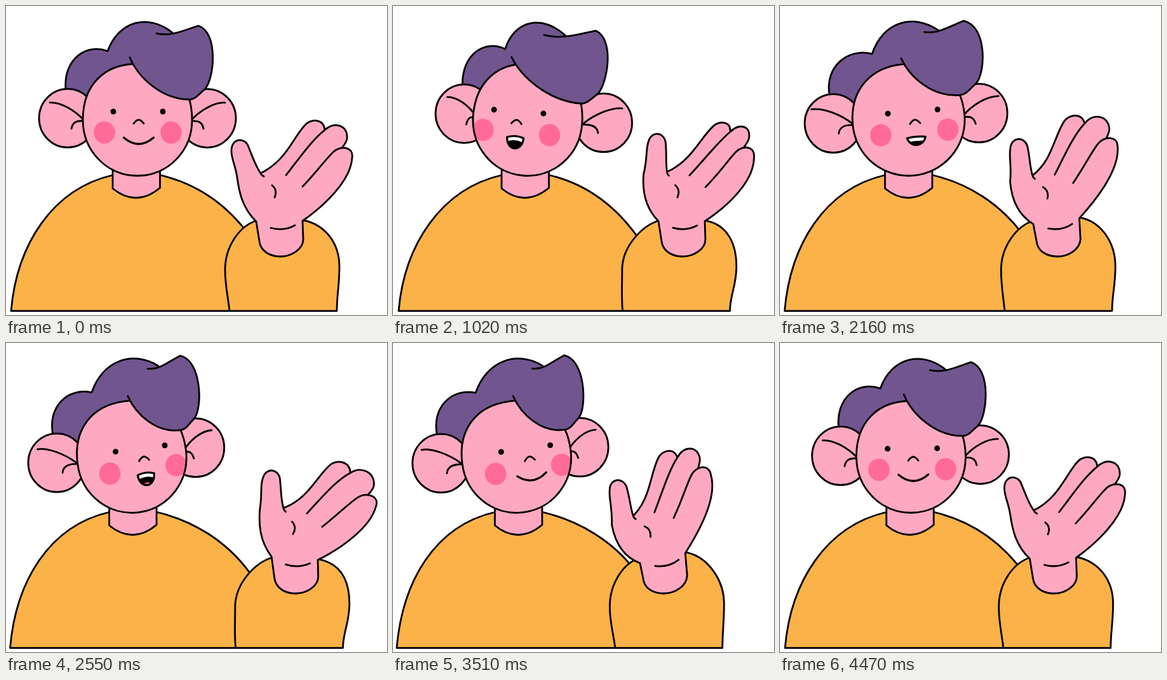
Animation of 600 by 486 pixels, one loop 4500 ms. Source, as an HTML page:

```html
<!DOCTYPE html>
<html lang="en">
<head>
<meta charset="utf-8">
<title>Waving hello</title>
<style>
html, body { margin: 0; width: 100%; height: 100%; overflow: hidden; background: #fff; }
svg { display: block; width: 100%; height: 100%; }
.ln { fill: none; stroke: #000; stroke-width: 2.8; stroke-linecap: round; stroke-linejoin: round; }
.skin { fill: #ffa8c2; }
.hair { fill: #71558f; }
.cloth { fill: #fbb248; }
.blush { fill: #ff6b98; }
</style>
</head>
<body>
<svg viewBox="0 0 600 486" xmlns="http://www.w3.org/2000/svg">
  <defs>
    <clipPath id="faceClip"><path id="faceMask"/></clipPath>
    <clipPath id="mouthClip"><path id="mouthMask"/></clipPath>
  </defs>
  <path id="body" class="ln cloth"/>
  <path id="neck" class="ln skin"/>
  <path id="backFill" class="hair"/>
  <path id="backLine" class="ln"/>
  <ellipse id="earL" class="ln skin" rx="45" ry="46"/>
  <ellipse id="earR" class="ln skin" rx="45" ry="46"/>
  <path id="earLines" class="ln"/>
  <path id="face" class="skin"/>
  <g clip-path="url(#faceClip)">
    <ellipse id="cheekL" class="blush" rx="16.8" ry="17.5"/>
    <ellipse id="cheekR" class="blush" rx="16.8" ry="17.5"/>
  </g>
  <path id="faceRim" class="ln"/>
  <circle id="eyeL" r="4.5"/>
  <circle id="eyeR" r="4.5"/>
  <path id="nose" class="ln"/>
  <g id="mouth">
    <path id="mouthFill"/>
    <g clip-path="url(#mouthClip)">
      <path id="teeth" fill="none" stroke="#fff" stroke-width="13"/>
      <ellipse id="tongue" class="blush" rx="7" ry="4"/>
    </g>
    <path id="lips" class="ln" style="stroke-width:3.2"/>
  </g>
  <path id="lockFill" class="hair"/>
  <path id="lockLine" class="ln"/>
  <path id="sleeve" class="ln cloth"/>
  <path id="handFill" class="skin"/>
  <path id="handLine" class="ln"/>
</svg>
<script>
const LOOP = 4500, FLOOR = 479.6, RAD = Math.PI / 180;

// Head parts around the face centre: x, y and how far the point follows a turn.
const FACE = 'M-86,0 C-86,-54 -53,-88 0,-88 C53,-88 86,-54 86,0 C86,49 48,88 0,88 C-48,88 -86,49 -86,0Z';
const BACK = 'M-113,-48,-.4 C-117,-94,-.4 -82,-121,-.3 -47,-108,-.2 C-29,-157,.2 18,-167,.4 55,-137,.35';
const LOCK = 'M30,-136,.9 C53,-131,.5 68,-139,.2 96,-148 C128,-137 121,-64 106,-48 ' +
  'C96,-40 91,-32 82,-32 C38,-32,.4 1,-67,1 -12,-98,1.3';
const EAR = 'M-138,-27,-.6 C-122,-28,-.6 -100,-16,-.4 -85,0,-.2 M-104,14,-.5 C-102,3,-.5 -95,1,-.3 -85,2,-.2';
const NOSE = 'M-6,6,1.2 C0,-2,1.2 4,-2,1.2 10,6,1.2';

// Hand parts around the wrist.
const THUMB = 'M-36,-1 C-58,-22 -63,-48 -66,-70 C-69,-92 -76,-100 -75,-114 ' +
  'C-74,-133 -53,-134 -48,-118 C-41,-101 -37,-88 -29,-77';
const INDEX = 'C12,-97 22,-134 42,-154 C50,-162 70,-164 72,-145';
const MIDDLE = 'C87,-159 107,-152 107,-135 C108,-130 103,-122 100,-118';
const RING = 'C97,-121 118,-119 115,-101 C113,-65 70,-25 37,-2';
const CUFF = 'L38,27 C38,42 20,54 2,54 C-14,54 -29,46 -31,30 L-36,-1';
const CREASES = 'M72,-145 C52,-130 30,-98 11,-74 M37,-56 C60,-80 74,-100 86,-111 ' +
  'M-29,-77 C-28,-74 -26,-73 -24,-72 M-13,9 C-2,12 12,12 25,5 M-11,-58 C-5,-53 -4,-46 -7,-39';

// time, centre x, turn, tilt, frontal widening
const headAt = track([
  [0, 207, 0, 0, 0],
  [300, 212, -16, 4.4, 0],
  [1020, 212, -16, 4.4, 0],
  [1710, 208, -6, 0, 1],
  [2550, 198, 14, -7.3, 0],
  [3090, 195, 15, -7.3, 0],
  [4080, 194, 15.5, -8.5, 0]
]);

// time, wrist x, finger swing, finger fan, thumb swing
const handAt = track([
  [0, 430, 0, 0, 0],
  [580, 452, 6, 0, 8],
  [1020, 454, 1.3, -2, 11],
  [1710, 427, -20, -1.5, -3],
  [1880, 423, -20.5, -.5, -5],
  [2550, 454, 7.3, 1.5, 12],
  [3090, 443, -3.5, -1, .5],
  [3680, 421, -21, -.5, -6],
  [3960, 421, -20, 1, -9]
]);

// time, smile, talking
const moodAt = track([
  [0, 1, 0], [220, 1, 0], [330, 0, 1], [1260, 0, 1], [1420, .2, 0],
  [2000, .2, 0], [2120, 0, 1], [3090, 0, 1], [3260, .9, 0]
]);

// Periodic monotone cubic through the keys.
function track(keys) {
  const n = keys.length;
  const gap = k => (keys[(k + 1) % n][0] - keys[k][0] + LOOP) % LOOP;
  const rate = (k, i) => (keys[(k + 1) % n][i] - keys[k][i]) / gap(k);
  const slope = (k, i) => {
    const a = rate((k + n - 1) % n, i), b = rate(k, i);
    return a * b > 0 ? 2 * a * b / (a + b) : 0;
  };
  return t => {
    let k = n - 1;
    while (keys[k][0] > t) k--;
    const next = (k + 1) % n, h = gap(k), u = (t - keys[k][0]) / h;
    const s = u * u * (3 - 2 * u), p = u * (1 - u) * (1 - u) * h, q = u * u * (u - 1) * h;
    return keys[k].slice(1).map((v, j) =>
      v + (keys[next][j + 1] - v) * s + slope(k, j + 1) * p + slope(next, j + 1) * q);
  };
}

const $ = id => document.getElementById(id);
const set = (id, attrs) => {
  for (const name in attrs) $(id).setAttribute(name, attrs[name]);
};
const draw = (d, ...ids) => ids.forEach(id => set(id, { d }));
const place = (id, [cx, cy]) => set(id, { cx, cy });
const mix = (a, b, u) => a + (b - a) * u;
const ease = (from, to, v) => {
  const u = Math.min(1, Math.max(0, (v - from) / (to - from)));
  return u * u * (3 - 2 * u);
};
const spin = (x, y, deg) => {
  const c = Math.cos(deg * RAD), s = Math.sin(deg * RAD);
  return [x * c - y * s, x * s + y * c];
};
// Sends every point of a path through a rule.
const bend = (d, rule) => d.replace(/(-?[\d.]+),(-?[\d.]+)(?:,(-?[\d.]+))?/g,
  (_, x, y, depth = 0) => rule(+x, +y, +depth).map(v => v.toFixed(2)).join());

function drawBody(lean) {
  const left = 8 + lean * .17, x = 168 + lean * .6;
  draw(`M${left},${FLOOR} C${left + 9},375 ${x - 95},288 ${x},266 L${x + 75},266
    C${x + 130},279 347,310 385,363 L400,${FLOOR}Z`, 'body');
  draw(`M${x},255 V287 Q${x + 37},317 ${x + 74.5},286 V255`, 'neck');
}

function drawHead([cx, turn, tilt, wide]) {
  const rig = (side, gain) => (x, y, depth) => {
    const [px, py] = spin(side * x * (1 + wide * x * x / 121000), y, tilt * gain);
    return [cx + px + turn * depth, 179 + py];
  };
  const at = rig(1, 1), earL = rig(1, .85), earR = rig(-1, .85);
  const back = bend(BACK, at), lock = bend(LOCK, at);
  draw(back, 'backLine');
  draw(back + bend('L30,-50 L-70,-20Z', at), 'backFill');
  draw(lock, 'lockLine');
  draw(lock + 'Z', 'lockFill');
  draw(bend(FACE, at), 'face', 'faceMask', 'faceRim');
  place('earL', earL(-110, -2.5, -.6));
  place('earR', earR(-110, -2.5, -.6));
  draw(bend(EAR, earL) + bend(EAR, earR), 'earLines');
  place('eyeL', at(-38, -13, 1));
  place('eyeR', at(40, -13, 1));
  place('cheekL', at(-52, 20, 1.05));
  place('cheekR', at(53, 20, 1.05));
  draw(bend(NOSE, at), 'nose');
  set('mouth', { transform: `translate(${at(2, 28, 1.2)}) rotate(${tilt})` });
  place('tongue', [0, 19 - turn * .15]);
  drawBody(cx - 207);
}

function drawMouth(t, [smile, talk]) {
  const beat = Math.cos(Math.PI * (t - 1020) / 218.6) ** 2;
  const open = talk * mix(5, 26, beat);
  const w = mix(16.5 + 7 * smile, 17 - 4 * beat, talk);
  const sag = mix(2 + 18 * smile, 1 - 6 * beat, talk);
  const upper = `M${-w},0 Q0,${sag} ${w},0`;
  const x = w / 3 + open * .3, y = sag * 2 / 3 + open;
  draw(`${upper} C${x},${y} ${-x},${y} ${-w},0Z`, 'mouthFill', 'mouthMask', 'lips');
  draw(upper, 'teeth');
}

function drawHand([cx, swing, fan, thumb]) {
  // Fingers and thumb swing round the wrist; the cuff stays.
  const at = (x, y) => {
    const angle = Math.atan2(x, -y) / RAD;
    const spread = fan * Math.max(-1, Math.min(1, (angle - 31) / 11)) * ease(-60, -120, y);
    const thumbShare = (1 - ease(-50, 0, x)) * ease(-40, -110, y);
    const [px, py] = spin(x, y, mix(swing + spread, thumb, thumbShare) * ease(40, -30, y));
    return [cx + px, 340 + py];
  };
  const move = cx - 430, side = move * .66, foot = move * .4;
  const [lx] = at(-36, -1), [rx, ry] = at(37, -2);
  draw(`M${352 + foot},${FLOOR} C${350 + foot},460 ${345 + side},440 ${345 + side},415
    C${345 + side},380 ${lx - 28},346 ${lx + 2},337 L${rx + 2},${ry - 1}
    C${rx + 35},${ry + 6} ${525 + side},372 ${525 + side},410
    C${525 + side},440 ${521 + foot},455 ${521 + foot},${FLOOR}Z`, 'sleeve');
  const tips = THUMB + INDEX + MIDDLE;
  draw(bend(tips + 'L86,-111' + RING + CUFF + 'Z', at), 'handFill');
  draw(bend(tips + 'M86,-111' + RING + CUFF + CREASES, at), 'handLine');
}

function render(t) {
  drawHead(headAt(t));
  drawMouth(t, moodAt(t));
  drawHand(handAt(t));
}

const begin = performance.now();
function tick() {
  render((performance.now() - begin) % LOOP);
  requestAnimationFrame(tick);
}
render(0);
requestAnimationFrame(tick);
</script>
</body>
</html>
```
